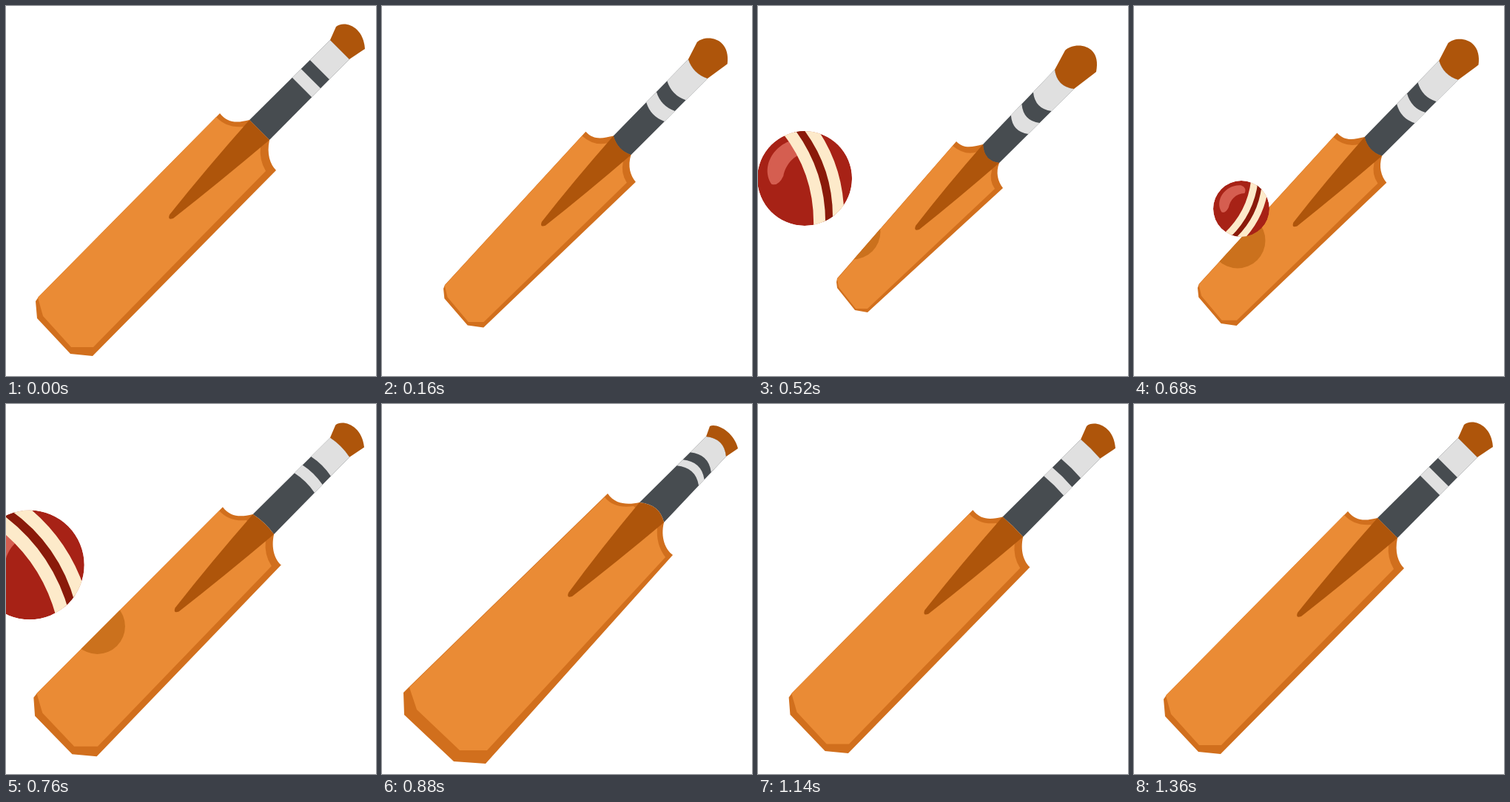
An HTML page with a canvas for the animation above (1.68 s loop, 500x500 px).

```html
<!DOCTYPE html>
<html lang="en">
<head>
<meta charset="utf-8">
<title>Cricket bat and ball</title>
<style>
  html, body { margin: 0; width: 100%; height: 100%; overflow: hidden; background: #fff; }
  canvas { display: block; width: 100vw; height: 100vh; }
</style>
</head>
<body>
<canvas id="stage" width="500" height="500"></canvas>
<script>
const ctx = document.getElementById('stage').getContext('2d');
const LOOP = 1680, STEP = 20, HIT = 700;
const COLOR = {
  face: '#ea8b35', edge: '#d16f1d', wood: '#ae550b', grip: '#474c50', tape: '#e0e0e0',
  shadow: '#cb711d', ball: '#a72216', shine: '#d55e50', groove: '#8a1a0a', seam: '#fdeaca'
};

// Each point: x, y at rest, then drawn back, then swung forward.
const OUTLINE = {
  topLeft: [289, 145, 268, 183, 305, 121],
  leftC1: [300, 159, 279, 194, 316, 137],
  leftC2: [313, 158, 290, 190, 334, 136],
  baseLeft: [329, 154, 304, 187, 348, 133],
  baseRight: [356, 181, 326, 212, 381, 160],
  rightC1: [352, 200, 321, 225, 376, 180],
  rightC2: [357, 214, 324, 237, 383, 197],
  topRight: [365, 222, 331, 246, 393, 204],
  toe1: [117, 473, 148, 414, 140, 486],
  toe2: [87, 470, 131, 411, 97, 483],
  toe3: [42, 422, 107, 381, 30, 420],
  toe4: [40, 399, 106, 373, 29, 390],
  toe5: [44, 393, 107, 368, 37, 382]
};
const FACE = {
  left: [284, 150, 263, 189, 301, 126],
  leftC: [298, 165, 280, 203, 314, 142],
  leftEnd: [320, 163, 297, 197, 340, 138],
  right: [344, 190, 316, 222, 372, 167],
  rightC: [342, 208, 312, 236, 370, 190],
  rightEnd: [351, 223, 320, 247, 383, 207],
  toe1: [118, 461, 148, 409, 142, 468],
  toe2: [88, 461, 132, 409, 105, 468],
  toe3: [50, 419, 109, 380, 47, 413],
  toe4: [43, 394, 107, 369, 37, 383]
};
const HANDLE = {
  tip: [217, 291, 209, 306, 248, 264],
  endLeft: [438, 46, 401, 86, 438, 44],
  endRight: [464, 72, 427, 112, 465, 71],
  knob1: [446, 28, 415, 60, 443, 30],
  knobC1: [456, 19, 427, 48, 452, 25],
  knobC2: [483, 26, 465, 50, 476, 38],
  knob2: [485, 58, 457, 89, 481, 60]
};
// Tape positions along the handle, and band curvature, per pose.
const BANDS = [[.53, .39, .56], [.64, .54, .65], [.75, .70, .76]];
const BEND = [0, 10, -11];

const clamp = (v) => Math.min(1, Math.max(0, v));
const mix = (a, b, k) => a + (b - a) * k;
const lerp = (p, q, k) => [mix(p[0], q[0], k), mix(p[1], q[1], k)];

function swingAt(t) {
  if (t < 604) return { back: 1 - (1 - clamp(t / 540)) ** 3, fore: 0 };
  if (t < 880) {
    const u = (t - 604) / 276;
    const s = 1 - 2 * (u < .5 ? 2 * u * u : 1 - 2 * (1 - u) ** 2);
    return { back: Math.max(s, 0), fore: Math.max(-s, 0) };
  }
  const u = clamp((t - 880) / 480);
  return { back: .05 * Math.sin(Math.PI * u), fore: (1 - u ** 1.3) ** 3.2 };
}

function poser({ back, fore }) {
  const blend = (r, b, f) => r + (b - r) * back + (f - r) * fore;
  const point = (p) => [blend(p[0], p[2], p[4]), blend(p[1], p[3], p[5])];
  const all = (set) => Object.fromEntries(Object.entries(set).map(([k, p]) => [k, point(p)]));
  return { blend, all };
}

const move = (p) => ctx.moveTo(...p);
const line = (...points) => points.forEach((p) => ctx.lineTo(...p));
const quad = (c, p) => ctx.quadraticCurveTo(...c, ...p);
const cubic = (a, b, p) => ctx.bezierCurveTo(...a, ...b, ...p);

function fill(color, trace) {
  ctx.beginPath();
  trace();
  ctx.closePath();
  ctx.fillStyle = color;
  ctx.fill();
}

function disc(x, y, r, color) {
  fill(color, () => ctx.arc(x, y, r, 0, 2 * Math.PI));
}

function drawBat(swing, ball) {
  const { blend, all } = poser(swing);
  const o = all(OUTLINE), f = all(FACE), h = all(HANDLE);
  const bend = blend(...BEND);
  const band = (p, q) => {
    const [x, y] = lerp(p, q, .5);
    quad([x - bend, y + bend], q);
  };
  const traceBlade = () => {
    move(o.topLeft);
    cubic(o.leftC1, o.leftC2, o.baseLeft);
    line(o.baseRight);
    cubic(o.rightC1, o.rightC2, o.topRight);
    line(o.toe1, o.toe2, o.toe3, o.toe4, o.toe5);
  };

  fill(COLOR.edge, traceBlade);
  fill(COLOR.face, () => {
    move(f.left);
    quad(f.leftC, f.leftEnd);
    line(f.right);
    quad(f.rightC, f.rightEnd);
    line(f.toe1, f.toe2, f.toe3, f.toe4);
  });

  if (ball) {
    ctx.save();
    ctx.beginPath();
    traceBlade();
    ctx.clip();
    disc(140.7 - 12 * ball.away, 317.7 - 12 * ball.away, 37.5, COLOR.shadow);
    ctx.restore();
  }

  const [tx, ty] = h.tip;
  const leftMid = lerp(o.baseLeft, h.tip, .5), rightMid = lerp(o.baseRight, h.tip, .5);

  const stops = [0, ...BANDS.map((b) => blend(...b)), 1];
  const edges = stops.map((k) => [
    lerp(o.baseLeft, h.endLeft, k), lerp(o.baseRight, h.endRight, k)
  ]);
  const segment = (i, j, color) => fill(color, () => {
    const [a, b] = edges[i], [c, d] = edges[j];
    move(a);
    band(a, b);
    line(d);
    band(d, c);
  });
  segment(0, 4, COLOR.grip);
  segment(1, 2, COLOR.tape);
  segment(3, 4, COLOR.tape);

  fill(COLOR.wood, () => {
    move(o.baseLeft);
    quad([leftMid[0] - 3, leftMid[1] - 2], [tx + 4, ty - 9]);
    quad([tx + 1, ty - 1], [tx + 9, ty - 4]);
    quad([rightMid[0] + 2, rightMid[1] + 2], o.baseRight);
    band(o.baseRight, o.baseLeft);
  });
  fill(COLOR.wood, () => {
    move(h.endLeft);
    line(h.knob1);
    cubic(h.knobC1, h.knobC2, h.knob2);
    line(lerp(h.knob2, h.endRight, .15), h.endRight);
    band(h.endRight, h.endLeft);
  });
}

// "away" is the distance left to the bat: it falls to 0 at the hit, then grows.
function ballAt(t) {
  if (t < 200 || t > 860) return null;
  const away = t < HIT ? (HIT - t) ** 1.3 / 806 : 3.6 * (t - HIT) / 150;
  return {
    away,
    x: 150 - 82 * away,
    y: 276.5 - 41 * away,
    r: 36.4 + 26 * away,
    turn: (29.7 - 45 * away) * Math.PI / 180
  };
}

function drawBall({ x, y, r, turn }) {
  ctx.save();
  ctx.translate(x, y);
  ctx.scale(r, r);
  ctx.beginPath();
  ctx.arc(0, 0, 1, 0, 2 * Math.PI);
  ctx.clip();
  disc(0, 0, 1, COLOR.ball);
  fill(COLOR.shine, () => {
    move([-.7, .12]);
    cubic([-.97, -.3], [-.55, -.88], [0, -.83]);
    quad([.2, -.75], [.12, -.55]);
    cubic([-.2, -.55], [-.4, -.3], [-.45, -.05]);
    quad([-.55, .17], [-.7, .12]);
  });
  ctx.rotate(turn);
  const stripe = (at, width, color) => {
    ctx.beginPath();
    ctx.moveTo(at, -1.1);
    ctx.quadraticCurveTo(at + .4, 0, at, 1.1);
    ctx.lineWidth = width;
    ctx.strokeStyle = color;
    ctx.stroke();
  };
  stripe(.18, .24, COLOR.groove);
  stripe(-.03, .25, COLOR.seam);
  stripe(.39, .24, COLOR.seam);
  ctx.restore();
}

function draw(now) {
  const t = Math.floor((now % LOOP) / STEP) * STEP;
  const ball = ballAt(t);
  ctx.fillStyle = '#fff';
  ctx.fillRect(0, 0, 500, 500);
  drawBat(swingAt(t), ball);
  if (ball) drawBall(ball);
}

const start = performance.now();
function tick() {
  draw(performance.now() - start);
  requestAnimationFrame(tick);
}
tick();
</script>
</body>
</html>
```
